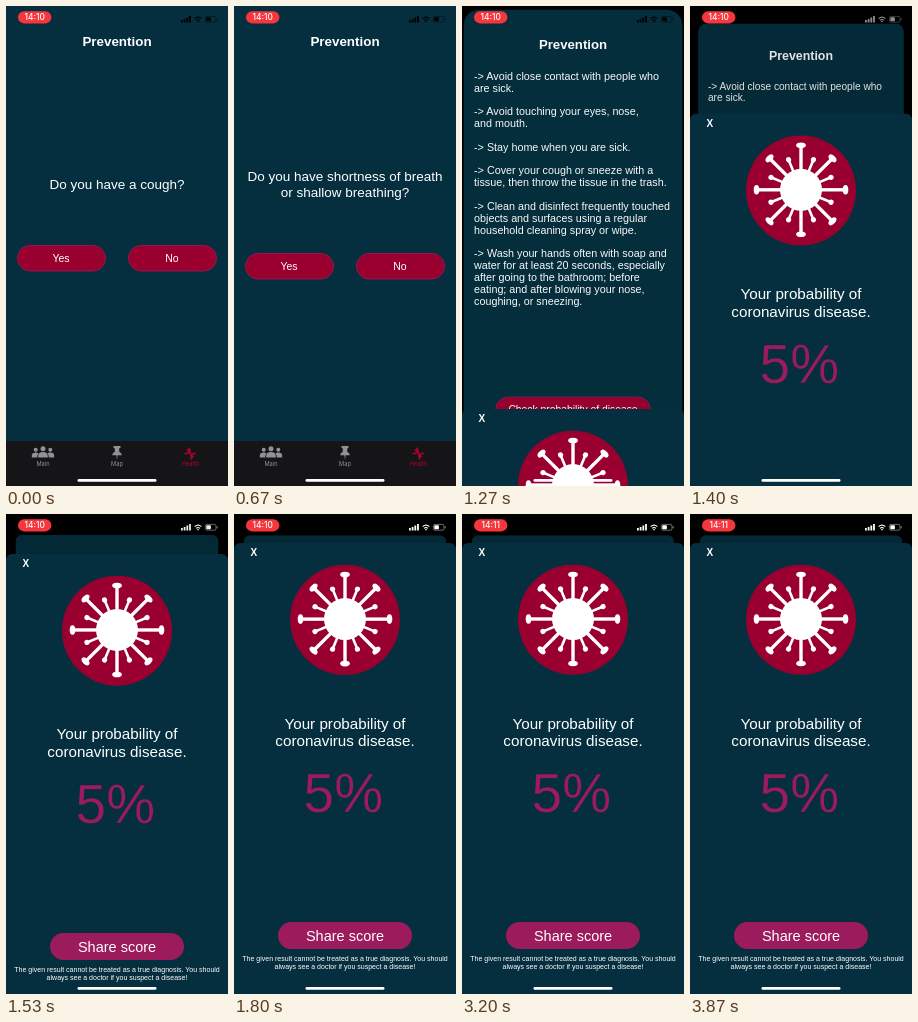
Write an HTML page that moves like this. It is 222x480 px and loops after 4.07 s.

```html
<!DOCTYPE html>
<html lang="en">
<head>
<meta charset="utf-8">
<title>Prevention</title>
<style>
  html, body { margin: 0; width: 100%; height: 100%; overflow: hidden; background: #000; }
  svg { display: block; width: 100%; height: 100%; }
  text { font-family: "Liberation Sans", Arial, sans-serif; fill: #fff; white-space: pre; }
  .mid { text-anchor: middle; }
  .bold { font-weight: bold; }
  .title { font-size: 13.4px; }
  .question { font-size: 13.5px; }
  .label { font-size: 10.5px; }
  .tips { font-size: 10.95px; }
  .result { font-size: 15.2px; }
  .score { font-size: 55px; fill: #9c1b5d; stroke: #052f3e; stroke-width: .3px; }
  .note { font-size: 7.03px; }
  .tab { font: 5.7px Inter, sans-serif; text-anchor: middle; fill: #929294; }
  .clock { font: 500 8.4px Inter, sans-serif; text-anchor: middle; }
  .bg { fill: #052f3e; }
  .btn { fill: #99002f; stroke: #95164c; stroke-width: 1; }
</style>
</head>
<body>
<svg viewBox="0 0 222 480">
  <rect width="222" height="480"/>

  <g id="page">
    <rect id="card" class="bg" width="222" height="480"/>
    <text class="title bold mid" x="111" y="39.5">Prevention</text>

    <g id="quiz">
      <text id="first" class="question mid" x="111" y="182.5">Do you have a cough?</text>
      <g id="second" class="question mid">
        <text x="111" y="175">Do you have shortness of breath</text>
        <text x="111" y="191">or shallow breathing?</text>
      </g>
      <g id="answers">
        <rect class="btn" x="11.5" y="239.5" width="88" height="25.5" rx="12.7"/>
        <text class="label mid" x="55" y="256">Yes</text>
        <rect class="btn" x="122.5" y="239.5" width="88" height="25.5" rx="12.7"/>
        <text class="label mid" x="166" y="256">No</text>
      </g>
    </g>

    <g id="advice">
      <g id="tips" class="tips"></g>
      <rect class="btn" x="32.5" y="393.5" width="157" height="25.5" rx="12.7"/>
      <text class="label mid" x="111" y="410">Check probability of disease</text>
    </g>

    <g id="tabs">
      <rect y="435" width="222" height="45" fill="#151517"/>
      <g fill="#929294">
        <circle cx="29.7" cy="443.8" r="2"/>
        <circle cx="37" cy="442.7" r="2.5"/>
        <circle cx="44.3" cy="443.8" r="2"/>
        <path d="M25.8 451.5v-2q0-3 4-3 2 0 2.6 1-1.2 1.5-1.2 4zM32.2 451.5v-1.5q0-4 4.8-4t4.8 4v1.5zM48.2 451.5v-2q0-3-4-3-2 0-2.6 1 1.2 1.5 1.2 4z"/>
        <path d="M107.5 440h7v1.8l-1.3.8v3.2q2.6 1 2.6 3.5h-4.2l-.6 5-.6-5h-4.2q0-2.5 2.6-3.5v-3.2l-1.3-.8z"/>
      </g>
      <path d="M178.500 447.5h3.3l1.600-6 2 12 1.500-6h3M181 443.5l6.5 7.5" fill="none" stroke="#b00030" stroke-width="1.3"/>
      <text class="tab" x="37" y="460">Main</text>
      <text class="tab" x="111" y="460">Map</text>
      <text class="tab" x="184.5" y="460" style="fill:#b00030">Health</text>
    </g>
    <rect id="dim" width="222" height="480"/>
  </g>

  <g id="sheet">
    <rect class="bg" y="29" width="222" height="470" rx="6"/>
    <text class="bold mid" x="19.8" y="42" font-size="10">X</text>
    <circle cx="111" cy="105.7" r="55" fill="#99002f"/>
    <g id="virus" transform="translate(111 105)" fill="#fff"><circle r="21"/></g>
    <text class="result mid" x="111" y="214.5">Your probability of</text>
    <text class="result mid" x="111" y="232">coronavirus disease.</text>
    <text class="score mid" x="109.3" y="298">5%</text>
    <rect x="44" y="408" width="134" height="27" rx="13.5" fill="#9c1b5d"/>
    <text class="mid" x="111" y="426.8" font-size="14.5">Share score</text>
    <text class="note mid" x="111" y="447.3">The given result cannot be treated as a true diagnosis. You should</text>
    <text class="note mid" x="111" y="455.3">always see a doctor if you suspect a disease!</text>
  </g>

  <rect x="12" y="5.2" width="33.4" height="12.2" rx="6.1" fill="#f5363d"/>
  <text id="clock" class="clock" x="28.7" y="14.3"></text>
  <g id="status">
    <path d="M175 14h1.8v2.5h-1.8zM177.700 13h1.8v3.5h-1.8zM180.400 11.5h1.8v5h-1.8zM183.100 10h1.8v6.5h-1.8z"/>
    <path d="M188.600 12.700q3.400-3.200 6.800 0M190 14.300q2-1.700 4 0" fill="none" stroke="currentColor" stroke-width="1.1"/>
    <circle cx="192" cy="15.6" r=".8"/>
    <rect x="199.4" y="10.4" width="10.6" height="5.8" rx="1.6" fill="none" stroke="currentColor" stroke-width=".7" opacity=".6"/>
    <rect x="200.3" y="11.3" width="4.6" height="4" rx=".7"/>
    <rect x="210.7" y="12.3" width=".9" height="2" rx=".4" opacity=".6"/>
  </g>
  <rect x="71.5" y="473" width="79" height="2.8" rx="1.4" fill="#fff"/>
</svg>

<script>
const LOOP = 4070, NEXT_QUESTION = 400, ADVICE = 870, SHEET = 1231.3, MINUTE = 2400;
const $ = id => document.getElementById(id);
const show = (id, on) => $(id).setAttribute("display", on ? "inline" : "none");

const tips = `-> Avoid close contact with people who
are sick.

-> Avoid touching your eyes, nose,
and mouth.

-> Stay home when you are sick.

-> Cover your cough or sneeze with a
tissue, then throw the tissue in the trash.

-> Clean and disinfect frequently touched
objects and surfaces using a regular
household cleaning spray or wipe.

-> Wash your hands often with soap and
water for at least 20 seconds, especially
after going to the bathroom; before
eating; and after blowing your nose,
coughing, or sneezing.`;
$("tips").innerHTML = tips.split("\n")
  .map((line, i) => `<text x="10.5" y="${71.2 + i * 12.02}">${line}</text>`).join("");

// Eight long capped spikes with eight short ones between them
for (let i = 0; i < 16; i++) {
  const spike = i % 2
    ? `<rect x="18" y="-1.3" width="14" height="2.6"/><circle cx="32.5" r="2.6"/>`
    : `<rect x="18" y="-1.7" width="26" height="3.4"/><ellipse cx="44.5" rx="2.8" ry="4.8"/>`;
  $("virus").innerHTML += `<g transform="rotate(${i * 22.5})">${spike}</g>`;
}

// Critically damped spring from 0 to 1
function spring(ms) {
  const x = Math.max(0, ms) * 0.0187;
  return 1 - (1 + x) * Math.exp(-x);
}

function draw(t) {
  const p = spring(t - SHEET), second = t >= NEXT_QUESTION;
  show("first", !second);
  show("second", second);
  $("answers").setAttribute("transform", `translate(0 ${second ? 8 : 0})`);
  show("quiz", t < ADVICE);
  show("advice", t >= ADVICE);

  $("page").setAttribute("transform", `translate(111 240) scale(${1 - 0.09 * p}) translate(-111 -240)`);
  $("card").setAttribute("rx", p > 0 ? 18 - 12 * p : 0);
  $("dim").setAttribute("opacity", 0.14 * p);
  $("sheet").setAttribute("transform", `translate(0 ${451 * (1 - p)})`);
  show("sheet", p > 0);

  $("clock").textContent = t < MINUTE ? "14:10" : "14:11";
  const shade = Math.round(255 * p ** 3);
  $("status").style.fill = $("status").style.color = `rgb(${shade},${shade},${shade})`;
}

const start = performance.now();
function frame() {
  draw((performance.now() - start) % LOOP);
  requestAnimationFrame(frame);
}
frame();
</script>
</body>
</html>
```
